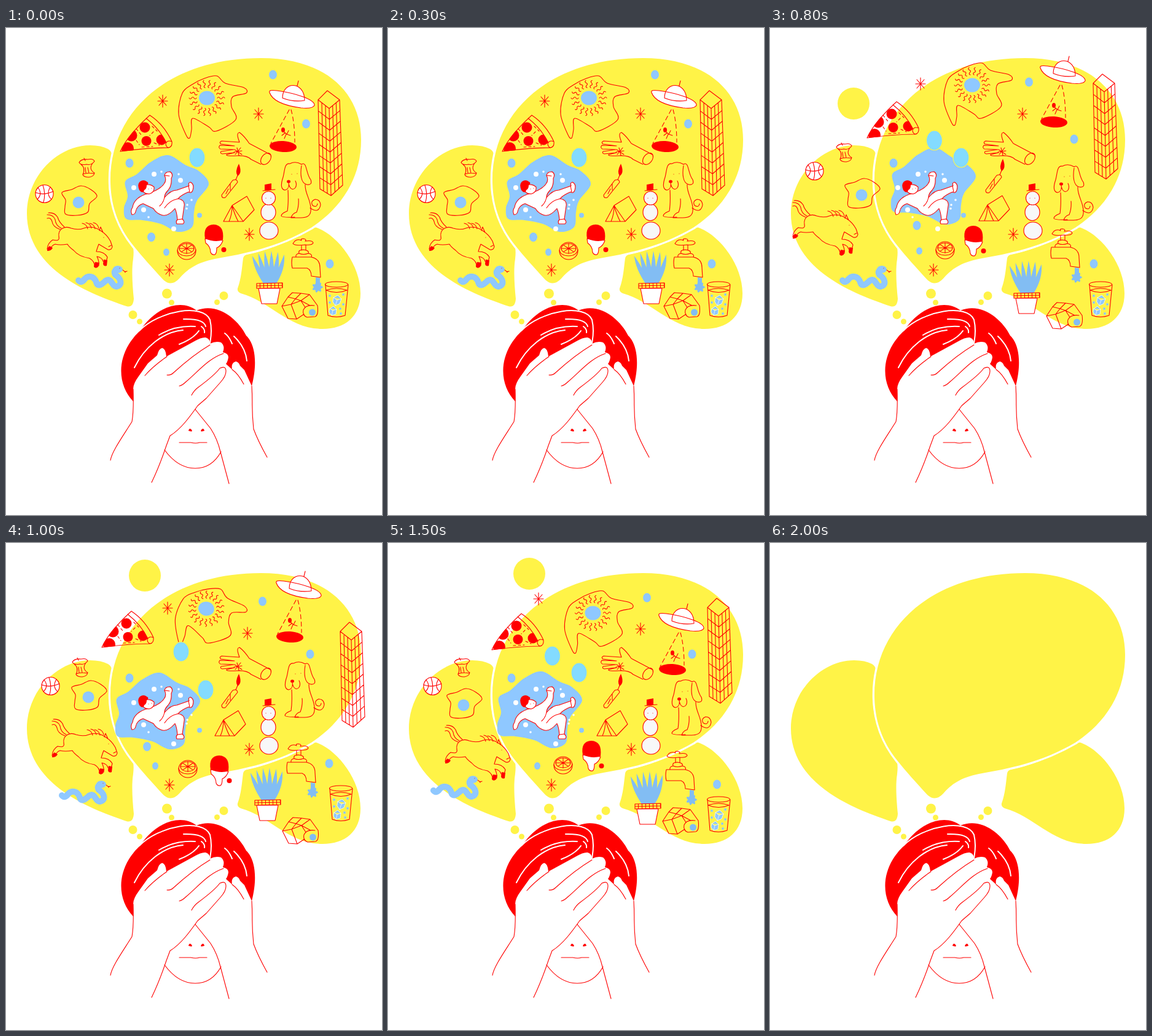
These frames come from a looping animation (612 px wide and 793 px high, 2.17 s). An HTML page:

```html
<!DOCTYPE html>
<html lang="en">
<head>
<meta charset="utf-8">
<title>Daydreams</title>
<style>
html, body { margin: 0; height: 100%; overflow: hidden; background: #fff; }
svg { display: block; width: 100vw; height: 100vh; }
path, circle, ellipse { stroke-linecap: round; stroke-linejoin: round; }
.line { fill: none; stroke: red; stroke-width: 1.1; }
.yellow { fill: #fff347; stroke: none; }
.red { fill: red; stroke: none; }
.blue { fill: #8fc8ff; stroke: none; }
.leaf { fill: #82bdf3; stroke: none; }
.cyan { fill: #83dbff; stroke: #fff347; }
.white { fill: #fff; }
.snow { fill: #f8f8f8; }
.shine { fill: none; stroke: #fff; stroke-width: 2; }
.foam { stroke: #fff; stroke-width: 8; }
.fizz { stroke: #8fc8ff; stroke-width: 4; }
.fine { stroke-width: 3.5; }
.snake { stroke: #8fc8ff; stroke-width: 10; }
.dash { stroke-dasharray: 7 5; }
.hatch { stroke-width: 8; stroke-dasharray: 1 5; stroke-linecap: butt; }
</style>
</head>
<body>
<svg viewBox="0 0 612 793">
<defs>
  <path id="star" d="M0-10V10M-8 0H8M-6-7L6 7M6-7L-6 7"/>
  <ellipse id="drop" rx="6.500" ry="7.500"/>
  <ellipse id="egg" rx="13" ry="16"/>
  <clipPath id="slice"><path d="M186 201C194 182 212 161 228 147Q250 164 261 186V195Z"/></clipPath>
</defs>

<g class="yellow">
  <path d="M137 191Q155 191 166 197Q173 201 172 209C158 265 175 315 205 353Q209 358 207 376C204 395 206 420 208 441Q207 456 196 453C140 434 34 395 34 302C34 240 85 191 137 191Z"/>
  <path d="M392 369C430 362 470 342 497 327Q502 323 508 326C542 340 577 387 577 432C577 470 552 490 515 490C460 490 430 445 382 432Q376 429 377 424C383 408 384 390 386 375Q387 370 392 369Z"/>
  <path d="M415 49C520 49 578 105 578 182C578 255 535 300 497 325C440 358 390 367 340 376C310 382 295 393 282 408Q269 422 256 410C238 390 222 373 207 354C180 320 170 285 170 247C170 135 265 49 415 49Z" style="stroke:#fff;stroke-width:6.5;paint-order:stroke"/>
  <circle cx="262" cy="432.500" r="8"/><circle cx="269.500" cy="447" r="4.500"/>
  <circle cx="206.500" cy="467" r="7"/><circle cx="217.500" cy="478" r="4.500"/>
  <circle cx="354.500" cy="436" r="7"/><circle cx="343.500" cy="446.500" r="4.500"/>
</g>

<g class="line">
  <path class="red" d="M207 608C185 585 180 548 200 515Q208 502 219 492C243 455 285 440 310 460C345 446 378 475 391 501C403 512 411 540 400 583L388 557L381 550Q379 544 374 543Q366 545 368 556L358 547Q361 543 362 536Q362 530 353 528Q357 518 350 512Q342 509 332 514Q332 506 325 504Q318 503 305 511L261 535Q260 522 254 521Q249 522 246 533L231 546L216 567Q207 579 207 588Z"/>
  <path class="shine" d="M217 493C250 460 320 448 332 475Q336 492 332 513M209 553C225 520 255 495 288 492M249 500Q275 484 308 486M289 474Q322 473 325 486M282 515Q305 506 314 493M318 486Q324 490 323 496M356 497Q363 502 368 514M371 502Q390 520 392 542"/>
  <path d="M226 566Q240 550 262 535M262 565Q268 566 273 561Q305 532 332 516M282 583Q287 582 293 576C315 557 330 538 354 530M302 598Q306 590 313 585Q340 565 348 554Q358 549 358 559Q358 567 349 577L326 603L312 615C300 632 285 653 267 664L261 680Q250 713 237 740"/>
  <path d="M207 588Q208 625 205 641C190 665 172 690 170 704M368 556Q378 563 387 580M400 583C402 615 399 615 403 653Q410 672 425 699M308 621L333 652Q344 669 349 690L363 742M258 687Q280 717 308 717Q335 717 350 690M282 675H301Q309 677 315 675H327"/>
  <path class="red" d="M297 656Q298 651 301 653Q304 656 302 657ZM323 656Q322 651 319 653Q316 656 318 657Z"/>
</g>

<!-- data-move: offsets from the first pose, "dx,dy[,angle,cx,cy]" or "-" to hide; the last one repeats.
     data-through: key points joined by a smooth closed curve -->
<g id="thoughts" class="line">
  <path class="blue" data-move="5,-12 -14,4 -14,2" data-through="264 207 292 223 314 233 330 254 311 281 306 300 303 324 280 332 252 319 222 313 196 311 192 293 198 274 194 250 213 238 236 218"/>

  <g class="blue">
    <use href="#drop" x="434.500" y="76" data-move="-13,12 -17,19 -13,13"/>
    <use href="#drop" x="488.500" y="156" data-move="6.5,25"/>
    <use href="#drop" x="201" y="220"/>
    <use href="#drop" x="236.500" y="340.500" data-move="2.5,-19 -7,-9 -"/>
    <use href="#drop" x="527" y="384" data-move="0,0 -1,-25 8.5,9"/>
    <ellipse cx="261" cy="365" rx="5" ry="6" data-move="-18,-2"/>
    <circle cx="315" cy="305" r="4"/>
  </g>
  <circle class="yellow late" cx="136" cy="123" r="26" data-move="0,0 90,-70 94,-73"/>
  <path class="foam" d="M241 238v.1M208 260v.1M284 248v.1M224 296v.1M273 327v.1"/>
  <path class="foam fine" d="M253 234v.1M281 238v.1M302 280v.1M295 288v.1M294 294v.1M232 308v.1"/>

  <g data-move="2,-21 -1,-7,12,327,114 6.5,0">
    <path data-through="323 82 343 78 357 90 387 97 391 106 369 112 367 128 374 149 342 168 330 161 304 147 302 165 299 179 293 174 281 140 287 106 303 92"/>
    <ellipse class="blue" cx="327" cy="114" rx="13" ry="11.500"/>
    <g id="rays" transform="translate(327,114)"></g>
  </g>

  <g data-move="-28,-22 -30,-31 -17,-27">
    <g class="red" clip-path="url(#slice)"><circle cx="226" cy="162" r="8.500"/><circle cx="204" cy="175" r="9.500"/><circle cx="228.500" cy="184" r="8"/><circle cx="253" cy="182" r="8.500"/><circle cx="198" cy="196" r="10"/></g>
    <path d="M186 201C194 182 216 158 234 142Q257 157 270 185M228 147Q250 164 261 187M186 201Q230 195 264 195Q271 194 270 185Q263 182 260 188Q260 194 265 195"/>
    <path stroke-dasharray="4 4" d="M212 164L220 174M240 169L234 175M212 183L217 190M221 194L239 193M238 160L246 168M241 187L250 191"/>
  </g>

  <g data-move="11,-40 11,-40 12,13">
    <path class="white" d="M429 105Q427 100 441 102C470 106 503 116 502 126Q499 132 480 130C450 126 433 117 429 105ZM450 114C450 86 486 86 486 118Q468 121 450 114ZM474 94L476 86"/>
    <path class="dash" d="M461 133L431 188M464 133Q470 155 470 186"/>
    <ellipse class="red" cx="451" cy="193" rx="22" ry="9" transform="rotate(3 451 193)"/>
    <ellipse class="red" cx="451" cy="166" rx="3" ry="4"/>
    <path d="M451 168L457 173L463 175M457 173L460 167M449 175L454 171M456 173L453 180"/>
  </g>

  <path id="tower" data-move="18,-27 36,27 12,-12"/>

  <g data-move="14,4 6,-25 14,4">
    <path d="M462 221C452 219 454 236 450 246C447 256 448 263 454 264C459 263 461 258 460 252C461 262 467 265 471 260Q474 255 471 249M462 221Q471 216 481 222C490 216 488 238 496 247Q499 256 490 255C479 253 479 236 481 224M459 264Q460 285 458 298Q448 302 448 306Q450 309 470 308M487 255C486 270 498 282 496 298Q495 309 480 309H464Q466 302 473 300Q477 290 476 278"/>
    <path d="M495 293Q509 303 512 288Q511 279 503 279Q495 282 499 289Q506 293 507 286M465 238v.1M474 237v.1"/>
    <ellipse class="red" cx="460" cy="250" rx="3" ry="2.500"/>
  </g>

  <path d="M430 206L396 188Q388 176 380 170Q375 171 378 180L380 186L351 184Q346 186 350 189L372 192L348 191Q345 195 349 197L371 198L350 201Q348 204 352 205L372 203L359 206Q357 209 376 208Q392 207 399 214L415 222M372 198L384 206M382 195L373 206M376 195L379 207M371 202L384 200"/>
  <ellipse cx="423" cy="213" rx="7" ry="10.500" transform="rotate(38 423 213)"/>

  <g data-move="0,-8">
    <path d="M369 248L351 272Q351 278 357 276L377 251Q376 245 369 248M374 247L377 240M365 254L365 264M362 262L358 270"/>
    <path class="red" d="M377 241Q372 234 379 221Q385 236 377 241Z"/>
  </g>

  <path data-move="-14,-1" d="M354 315L368 289L392 274L404 296L386 315ZM368 289L386 315M368 289Q368 304 363 315M368 289Q372 304 378 315"/>

  <g class="line snow">
    <ellipse cx="428" cy="330" rx="15" ry="14"/><ellipse cx="427" cy="300" rx="12" ry="13.500"/><circle cx="427.500" cy="277" r="11"/>
    <path d="M418 265L438 263M423 277v.1M431 277v.1"/>
    <path class="red" d="M421 255L432 253V264L421 265Z"/>
  </g>

  <g data-move="-7,2 9,26 -7,2">
    <path class="white" d="M324 343L353 346Q350 355 343 358Q343 367 340 369Q335 370 333 365Q333 356 325 350Z"/>
    <path class="red" d="M324 343Q320 321 338 320Q356 321 353 345Q341 350 324 343Z"/>
    <circle class="red" cx="354.500" cy="361" r="4"/>
  </g>

  <g data-move="-9,-1 2,5 -9,-1">
    <ellipse cx="294" cy="363" rx="15" ry="14"/><ellipse cx="294" cy="359" rx="12" ry="8"/>
    <path id="segments" d="M279 362Q281 371 294 371T309 361"/>
  </g>

  <g class="line white">
    <path d="M226 271Q250 264 257 254Q262 248 258 240Q259 234 267 234Q273 238 269 245Q270 257 264 264Q258 270 258 276Q268 264 278 264L298 257Q296 252 300 251Q307 254 304 264Q302 270 297 267Q285 272 280 278Q292 280 290 290L287 311Q292 316 288 319L278 319Q276 315 279 312Q278 300 275 294Q262 309 252 304Q244 301 240 294L223 286Q213 289 211 299Q210 304 205 304Q202 297 206 292Q208 278 226 271Z"/>
    <path fill="none" d="M258 276Q256 285 250 290M280 278Q266 281 258 293M258 240L266 241M297 257L299 267M279 312L287 311"/>
    <path d="M222 263Q224 271 234 270Q242 267 241 259Q236 254 228 255Z"/>
    <path class="red" d="M217 264Q213 255 218 250Q224 246 229 250Q234 252 229 256Q229 262 225 264Q223 271 217 264Z"/>
    <path d="M232 262v.1M237 261v.1"/>
  </g>

  <g data-move="10,-37">
    <circle class="white" cx="62.500" cy="270" r="14.500"/>
    <path d="M48 268Q62 273 77 266M60 256Q65 270 61 284M52 260Q60 270 51 279M72 259Q65 271 74 279"/>
  </g>

  <path data-move="-11,-25" d="M119 219Q122 213 133 214Q142 212 144 217Q139 224 131 222Q122 224 119 219M129 216L127 212M122 222Q130 228 125 239Q127 243 135 243Q143 242 144 236Q134 230 141 220M129 227L130 236M133 227L135 236M125 238Q133 235 143 237"/>

  <g data-move="31,-12 16,-33 5,-20">
    <path data-through="91 268 107 263 122 257 138 263 148 274 136 286 133 300 116 305 97 303 96 291 97 280"/>
    <circle class="blue" cx="118" cy="284" r="9.500"/>
  </g>

  <g data-move="-30,-20 8,-14 26,-4">
    <path d="M86 340C84 326 97 322 106 326Q118 330 130 325Q143 322 154 330Q164 336 170 347L173 356Q172 362 166 361L151 352Q148 360 147 364Q160 364 165 373L163 381L158 380Q157 374 148 372Q152 380 151 387L144 389Q145 380 136 375Q118 372 110 362Q102 356 100 352Q88 354 80 352Q74 354 72 361L67 360Q68 350 76 345Q88 348 86 340ZM152 330L154 324L158 333M159 341v.1M167 356L171 354"/>
    <path d="M88 328Q76 324 75 315Q73 308 67 310M90 326Q81 322 80 312Q77 304 67 304M95 324Q86 316 84 308Q79 300 69 301"/>
    <path id="mane"/>
    <path class="red" d="M67 363Q67 357 71 355L76 358Q74 363 67 363ZM145 381L152 382L150 389Q145 393 143 388ZM159 377L165 378L164 387Q159 389 158 384Z"/>
  </g>

  <g data-move="0,0 -27,0 -44,-8">
    <path class="snake" d="M126 411C134 400 144 405 147 414C150 424 158 415 163 411C172 406 172 421 180 421C192 418 185 406 178 402Q174 395 182 393"/>
    <path class="snake fine" d="M118 411Q122 416 127 410"/>
    <ellipse class="blue" cx="182" cy="393" rx="8" ry="6"/>
    <path d="M190 394Q193 398 197 396M193 396L194 398M185 391v.1"/>
  </g>

  <g data-move="-11,16 -3,3 -6,9">
    <path id="leaves" class="leaf"/>
    <path class="white" d="M411 424L416 449H441L446 424Z"/>
    <path class="yellow" d="M408 416L450 415V423L408 424Z"/>
    <path d="M408 416L450 415V423L408 424ZM408 420L450 419"/>
    <path class="hatch" d="M413 420L450 419"/>
  </g>

  <g data-move="-8,-16 -8,-16 -13,-4">
    <path id="splash" class="leaf"/>
    <path d="M470 347Q475 343 481 346Q479 343 484 343Q490 344 487 347Q499 345 500 350Q498 354 487 353Q470 355 467 351ZM481 354V362M488 354V362M472 373Q471 368 477 367Q475 361 484 361Q494 362 492 367Q499 368 497 373M477 367Q484 370 492 367M466 373L497 373Q511 376 511 390L512 406L497 404Q497 394 490 391L466 391Q464 382 466 373Z"/>
  </g>

  <g data-move="1,16 1,16 -2,0">
    <path d="M449 453L459 438L471 441L480 432L494 434L507 452Q509 468 503 470L490 471Q482 468 484 459Q488 450 502 452M449 453L459 473L473 474L485 466M459 438L466 431L480 432M449 453L464 450L471 441M464 450L473 474M464 450L480 444L494 434M471 441L480 444L487 455M480 444L495 452"/>
    <circle class="leaf" cx="498.500" cy="463" r="5.500"/>
  </g>

  <g data-move="0,0 7,-18 0,0">
    <ellipse cx="538" cy="417.500" rx="18.500" ry="4.500"/>
    <path d="M520 418L524 468Q538 473 552 468L557 418M521 427Q538 421 555 427Q538 434 521 427"/>
    <path fill="#8fc8ff" stroke="#fff" stroke-width=".7" d="M533 439L540 435L546 441L543 449L536 452L532 446ZM533 439L539 443L546 441M539 443L536 452M527 457L533 453L538 458L537 466L530 468L526 463ZM527 457L532 460L538 458M532 460L530 468"/>
    <path class="fizz" d="M527 436v.1M549 434v.1M527 447v.1M544 457v.1M549 450v.1M545 465v.1"/>
  </g>

  <use class="cyan" href="#egg" x="311" y="211" data-move="0,0 14,28 0,0"/>
  <use class="cyan late" href="#egg" x="267.500" y="183" data-move="0,0 17.5,-6 0,1"/>
  <use href="#star" x="255" y="119" data-move="-10,-28 8,-13 -10,-28"/>
  <use href="#star" x="411" y="140" data-move="0,0 -18,7 0,0"/>
  <use href="#star" x="396" y="336"/>
  <use href="#star" x="266" y="394"/>
</g>
</svg>
<script>
const $ = id => document.getElementById(id);
const thoughts = $('thoughts');
const loop = (n, part) => Array.from({ length: n }, (_, i) => part(i)).join('');
const trace = (id, d) => $(id).setAttribute('d', ($(id).getAttribute('d') || '') + d);
const mix = (a, b, k) => a.map((v, i) => v + (b[i] - v) * k);

// Closed Catmull-Rom curve through "x y x y ..."
function smooth(text) {
  const n = text.split(' ').map(Number), count = n.length / 2;
  const at = i => [0, 1].map(k => n[(i + count) % count * 2 + k]);
  const pull = (i, side) => at(i).map((v, k) => v + side * (at(i + 1)[k] - at(i - 1)[k]) / 6);
  return `M${at(0)}` + loop(count, i => `C${pull(i, 1)} ${pull(i + 1, -1)} ${at(i + 1)}`) + 'Z';
}
for (const el of document.querySelectorAll('[data-through]')) el.setAttribute('d', smooth(el.dataset.through));

$('rays').innerHTML = loop(18, i => `<path d="M17 0q2-3 4 0t4 0t4 0" transform="rotate(${i * 20})"/>`);
trace('segments', loop(8, i => `M294 359L${294 + 12 * Math.cos(i * .785)} ${359 + 8 * Math.sin(i * .785)}`));
trace('mane', loop(4, i => `M${124 + i * 6} ${318 - i % 2}q7 1 9 9`));
trace('leaves', loop(6, i => {
  const a = -.56 + i * .205, x = 422 + i * 3;
  return `M${x - 3} 416Q${x - 6 + 25 * Math.sin(a)} 392 ${429 + 53 * Math.sin(a)} ${416 - 53 * Math.cos(a)}Q${x + 7 + 25 * Math.sin(a)} 392 ${x + 3} 416Z`;
}));
trace('splash', 'M504 406L511 407V420H504Z' + loop(48, i => {
  const a = i * Math.PI / 24, r = 7.5 + 1.5 * Math.cos(7 * a);
  return `${i ? 'L' : 'M'}${507 + r * Math.cos(a)} ${422 + r * Math.sin(a)}`;
}));

// Tower: roof, uprights on both faces, one chevron per storey
const left = [[508, 117], [511, 262]], front = [[526, 131], [529, 273]], right = [[543, 117], [548, 256]];
const upright = (a, b, k) => `M${mix(a[0], b[0], k)}L${mix(a[1], b[1], k)}`;
trace('tower', 'M508 117L523 102L543 117'
  + loop(4, i => upright(left, front, i / 3) + upright(front, right, i / 3))
  + loop(9, i => 'M' + [left, front, right].map(([top, foot]) => mix(top, foot, i / 8)).join('L')));

const movers = [...document.querySelectorAll('[data-move]')].map(el => ({
  el, poses: [el.classList.contains('late') ? '-' : '0,0', ...el.dataset.move.split(' ')]
}));

function setPose(pose) {
  const empty = pose === 4;
  thoughts.style.display = empty ? 'none' : '';
  if (empty) return;
  for (const { el, poses } of movers) {
    const move = poses[Math.min(pose, poses.length - 1)];
    el.style.display = move === '-' ? 'none' : '';
    if (move === '-') continue;
    const [x, y, ...turn] = move.split(',');
    el.setAttribute('transform', `translate(${x},${y})` + (turn.length ? ` rotate(${turn})` : ''));
  }
}

let shown;
function draw() {
  const pose = Math.floor(performance.now() % 2170 / 500);
  if (pose !== shown) setPose(shown = pose);
  requestAnimationFrame(draw);
}
draw();
</script>
</body>
</html>
```
